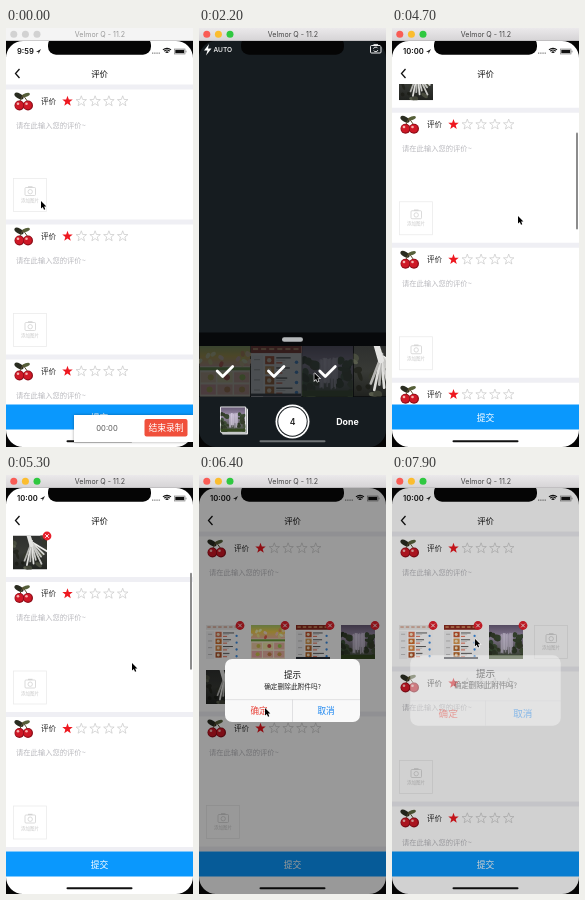
An HTML page with a canvas for the animation above (8000 ms loop, 187 px wide and 419 px high).

```html
<!DOCTYPE html>
<html lang="zh">
<head>
<meta charset="utf-8">
<style>
html, body { margin: 0; width: 100%; height: 100%; overflow: hidden; background: #000; }
canvas { display: block; width: 187px; height: 419px; }
</style>
</head>
<body>
<canvas id="stage"></canvas>
<script>
const W = 187, H = 419, LOOP = 8000, TOP = 13, MID = 93.5;
const cv = document.getElementById('stage'), c = cv.getContext('2d');
const dpr = window.devicePixelRatio || 1;
cv.width = W * dpr;
cv.height = H * dpr;

const CJK = '"Noto Sans CJK SC", "Noto Sans CJK", sans-serif';
const LATIN = 'Inter, Roboto, sans-serif';
const BLUE = '#0a98fd', DARK = '#161c20', BLACK = '#050505';

const clamp = v => Math.max(0, Math.min(1, v));
const ease = v => { v = clamp(v); return v * v * (3 - 2 * v); };
const ramp = (t, from, span) => ease((t - from) / span);
const times = (n, f) => Array.from({ length: n }, (_, i) => f(i));

// Schedule: pick five pictures, confirm, scroll, then delete one after another
const TILE = 51.3, SLIDE = 60, CLOSE = 3500;
const picks = times(5, i => i < 4 ? 700 + i * 250 : 2800);
const asks = times(3, i => 6100 + i * 850);
const answer = ask => ask + 400;
const slideAt = t => SLIDE * ramp(t, 1900, 400);
const scrollAt = t => 181 * Math.sin(Math.PI * clamp((t - 4200) / 1500));
const cell = i => [7 + i % 4 * 45, 88 + (i > 3 ? 45 : 0)];

const stop = (t, x, y, click = true) => ({ t, x, y, click });
const pickStop = i => stop(picks[i], Math.min(172, 26 + i * TILE - slideAt(picks[i])), 345);
const deleteStops = (ask, i) => {
  const [x, y] = cell(i ? 1 : 4);
  return [stop(ask, x + 34, y + 63), stop(answer(ask), 66, 233)];
};
const stops = [
  stop(100, 35, 173),
  ...times(4, pickStop),
  stop(1850, 172, 345, false),
  stop(2400, 112, 345, false),
  pickStop(4),
  stop(CLOSE, 151, 392),
  stop(4300, 126, 188, false),
  stop(5500, 126, 188, false),
  ...asks.flatMap(deleteStops)
];

function rect(x, y, w, h, fill) {
  c.fillStyle = fill;
  c.fillRect(x, y, w, h);
}
function round(x, y, w, h, r, fill) {
  c.beginPath();
  c.roundRect(x, y, w, h, r);
  c.fillStyle = fill;
  c.fill();
}
function disc(x, y, r, fill) {
  c.beginPath();
  c.arc(x, y, r, 0, 7);
  c.fillStyle = fill;
  c.fill();
}
function oval(x, y, rx, ry, turn, fill) {
  c.beginPath();
  c.ellipse(x, y, rx, ry, turn, 0, 7);
  c.fillStyle = fill;
  c.fill();
}
function line(pts, color, w = 1) {
  c.beginPath();
  pts.forEach(([x, y]) => c.lineTo(x, y));
  c.strokeStyle = color;
  c.lineWidth = w;
  c.stroke();
}
function poly(pts, fill) {
  c.beginPath();
  pts.forEach(([x, y]) => c.lineTo(x, y));
  c.closePath();
  c.fillStyle = fill;
  c.fill();
}
function text(s, x, y, size, color, align = 'center', weight = 400, font = CJK) {
  c.font = `${weight} ${size}px ${font}`;
  c.textAlign = align;
  c.textBaseline = 'middle';
  c.fillStyle = color;
  c.fillText(s, x, y);
}
function gradient(h, ...stops) {
  const g = c.createLinearGradient(0, 0, 0, h);
  stops.forEach((s, i) => g.addColorStop(i / (stops.length - 1), s));
  return g;
}
function random(seed) {
  return () => (seed = seed * 16807 % 2147483647) / 2147483647;
}

// Pictures on a 50 x 50 field
function listPic(banner) {
  const rnd = random(banner ? 71 : 29);
  rect(0, 0, 50, 50, '#fdfcfc');
  rect(0, 0, 50, 7, banner ? '#8e2a20' : '#eceae8');
  for (let x = 2; x < 46; x += 8) rect(x, 2, 5, 2, banner ? '#d99a68' : '#d8a08c');
  rect(0, 9, 12, 41, '#f1f1f2');
  for (let y = 10; y < 45; y += 10) {
    rect(3, y + 3, 6, 1, '#aaa');
    rect(14, y, 9, 8, `hsl(${15 + rnd() * 30}, 65%, ${38 + rnd() * 25}%)`);
    disc(18, y + 4, 2.2, '#f4e3c6');
    rect(25, y + 1, 9 + rnd() * 8, 1.4, '#555');
    rect(25, y + 3.6, 9, 1, '#ccc');
    rect(25, y + 6, 6, 1.3, '#e2593c');
    disc(45, y + 6, 1.7, '#3a8ee6');
  }
  if (banner) rect(0, 47, 50, 3, '#2c3038');
}
function foodPic() {
  const rnd = random(13);
  rect(0, 0, 50, 50, '#f8edd2');
  rect(0, 0, 50, 20, gradient(20, '#a9c86a', '#f2d04e', '#f3b7a8'));
  for (let i = 0; i < 14; i++) {
    oval(rnd() * 50, 5 + rnd() * 14, 3, 2, rnd() * 3, `hsl(${rnd() * 70}, 75%, ${60 + rnd() * 30}%)`);
  }
  rect(0, 21, 50, 3, '#6fa23c');
  for (let i = 0; i < 6; i++) {
    const x = 1 + i % 3 * 16.5, y = 26 + (i > 2 ? 12 : 0);
    rect(x, y, 15, 10, `hsl(${rnd() * 60}, 70%, 80%)`);
    disc(x + 5 + rnd() * 5, y + 5, 3, `hsl(${rnd() * 90}, 55%, 55%)`);
  }
}
function fallsPic() {
  const rnd = random(5);
  rect(0, 0, 50, 50, gradient(50, '#675a75', '#9a8ca8', '#6c6870', '#34432a'));
  for (let i = 0; i < 40; i++) {
    const side = rnd() < .5 ? rnd() * 14 : 50 - rnd() * 14;
    oval(side, 14 + rnd() * 36, 3 + rnd() * 3, 2 + rnd() * 3, rnd(), `hsl(${80 + rnd() * 30}, 18%, ${15 + rnd() * 14}%)`);
  }
  for (let i = 0; i < 18; i++) {
    const x = 17 + i, shade = 200 + rnd() * 50;
    rect(x, 11 + rnd() * 3, 1.2, 20 + rnd() * 12, `rgba(${shade - 12},${shade - 20},${shade},.75)`);
  }
  rect(0, 44, 50, 6, '#33471f');
}
function monoPic() {
  const rnd = random(17);
  rect(0, 0, 50, 50, gradient(50, '#2e302e', '#383a36', '#20221f'));
  for (let i = 0; i < 24; i++) {
    oval(rnd() * 50, rnd() * 50, 2 + rnd() * 4, 2 + rnd() * 3, rnd() * 3, `hsl(75, 10%, ${10 + rnd() * 24}%)`);
  }
  c.lineCap = 'round';
  for (let i = 0; i < 9; i++) {
    const a = .35 + i * .2, len = 24 + rnd() * 14, shade = 175 + rnd() * 70;
    line([[25 + i * .4, 8], [25 + len * Math.cos(a) * .8, 12 + len * Math.sin(a)]], `rgb(${shade},${shade},${shade - 3})`, 2.6);
  }
  line([[23, 0], [27, 14]], '#e4e4e2', 6);
  c.lineCap = 'butt';
}
const PICS = [() => listPic(false), foodPic, () => listPic(true), fallsPic, monoPic];
function pic(k, x, y, s) {
  c.save();
  c.beginPath();
  c.rect(x, y, s, s);
  c.clip();
  c.translate(x, y);
  c.scale(s / 50, s / 50);
  PICS[k]();
  c.restore();
}

function cherries(x, y) {
  oval(x + 5, y + 5, 5, 2.6, .5, '#2a2c20');
  oval(x + 12, y + 4, 4, 1.8, -.3, '#56603a');
  for (const dx of [5.5, 14]) {
    line([[x + 9, y + 4], [x + dx, y + 11]], '#5a5030');
    disc(x + dx, y + 14.5, 5, '#8c0d18');
    disc(x + dx - .3, y + 14.2, 4, '#cf1826');
    disc(x + dx - 1.5, y + 12.8, 1.3, '#f5b4b0');
  }
}
function star(x, y, on) {
  c.beginPath();
  for (let i = 0; i < 10; i++) {
    const r = i % 2 ? 2.3 : 5.5, a = -Math.PI / 2 + i * Math.PI / 5;
    c.lineTo(x + r * Math.cos(a), y + r * Math.sin(a));
  }
  c.closePath();
  c.fillStyle = '#ee1820';
  c.strokeStyle = '#c8c8c8';
  c.lineWidth = .7;
  on ? c.fill() : c.stroke();
}
function addBox(x, y) {
  c.lineWidth = .8;
  c.strokeStyle = '#ebebeb';
  c.strokeRect(x + .5, y + .5, 33, 33);
  c.strokeStyle = '#d2d2d2';
  c.beginPath();
  c.roundRect(x + 12, y + 9.5, 10.5, 8, 1);
  c.moveTo(x + 19.4, y + 13.7);
  c.arc(x + 17.2, y + 13.7, 2.2, 0, 7);
  c.stroke();
  rect(x + 15, y + 8.3, 4.5, 1.2, '#d2d2d2');
  text('添加图片', x + 17, y + 22.5, 4.5, '#cacaca');
}
function badge(x, y) {
  disc(x, y, 4.4, '#e8202c');
  for (const d of [-1.8, 1.8]) line([[x - 1.8, y - d], [x + 1.8, y + d]], '#fff', .9);
}

// One review card; returns its height
function card(y, photos) {
  rect(0, y - 5.5, W, 5, '#efeff4');
  cherries(8, y + 1);
  text('评价', 35, y + 11, 7.5, '#222', 'left');
  for (let i = 0; i < 5; i++) star(61.5 + i * 13.8, y + 11.3, i === 0);
  text('请在此输入您的评价~', 10, y + 35, 7.3, '#b9b9be', 'left');
  const cells = Math.min(5, photos.length + 1);
  for (let i = 0; i < cells; i++) {
    const [x, dy] = cell(i);
    if (i < photos.length) {
      pic(photos[i], x, y + dy, 34);
      badge(x + 34, y + dy + .5);
    } else addBox(x, y + dy);
  }
  return cells > 4 ? 180 : 135;
}

function statusBar(t) {
  const late = t >= 3600, x = late ? 34 : 30;
  text(late ? '10:00' : '9:59', 11, 23.5, 7.6, '#111', 'left', 600, LATIN);
  poly([[x, 24], [x + 5, 21], [x + 2.5, 26], [x + 2.4, 24]], '#222');
  for (let i = 0; i < 4; i++) rect(146 + i * 2.2, 24.5, 1.3, 1.3, '#888');
  for (let i = 1; i < 4; i++) {
    c.beginPath();
    c.arc(161, 26, i * 1.9, -2.35, -.8);
    c.strokeStyle = '#111';
    c.lineWidth = 1.2;
    c.stroke();
  }
  c.strokeStyle = '#777';
  c.lineWidth = .6;
  c.strokeRect(168.5, 21, 10.5, 5);
  rect(169.3, 21.8, 8.9, 3.4, '#111');
  rect(179.6, 22.6, .8, 1.8, '#777');
}
function homeBar(color) {
  round(60.5, 412.2, 66, 2, 1, color);
}

function photosAt(t) {
  if (t < CLOSE + 100) return [];
  const gone = asks.filter(a => t >= answer(a) + 50).length;
  const photos = [0, 1, 2, 3, 4].slice(0, gone ? 4 : 5);
  if (gone > 1) photos.splice(1, gone - 1);
  return photos;
}

function page(t) {
  rect(0, TOP, W, H, '#fff');
  const scroll = scrollAt(t);
  let y = 62 - scroll;
  for (let i = 0; y < 385; i++) y += card(y, i ? [] : photosAt(t));
  if (t >= 4300 && t < 5800) round(184, 56 + scroll * .31, 2, 97, 1, '#8c8c8c');

  rect(0, TOP, W, 43, '#fff');
  statusBar(t);
  line([[13.5, 41], [9.5, 45.5], [13.5, 50]], '#111', 1.3);
  text('评价', MID, 45.5, 8.4, '#111', 'center', 500);
  rect(0, 376.5, W, 43, '#fff');
  rect(0, 376.5, W, 25, BLUE);
  text('提交', MID, 389.5, 8.8, '#fff');
  homeBar('#111');
}

function toolbar(n) {
  rect(0, 369, W, 50, DARK);
  if (n) {
    for (let i = Math.min(n, 3) - 1; i >= 0; i--) {
      round(21 + i, 378.5 + i, 26, 26, 1, i % 2 ? '#9fa3a5' : '#f0f0f0');
    }
    pic(n - 1, 21.7, 379.2, 24.6);
    text('Done', 148.5, 394, 8.8, '#fff', 'center', 700, LATIN);
  }
  disc(MID, 393.5, 17, '#fff');
  disc(MID, 393.5, 15.2, DARK);
  disc(MID, 393.5, 14.2, '#fff');
  if (n) text(n, MID, 394, 8.6, '#222', 'center', 600, LATIN);
  homeBar('#6f7375');
}

function camera(t, off) {
  c.save();
  c.translate(0, off);
  rect(0, TOP, W, H, DARK);
  poly([[10, 16], [5, 22.5], [8.5, 22.5], [7, 27.5], [12.5, 20.5], [9, 20.5]], '#fff');
  text('AUTO', 14.5, 21.7, 6.6, '#fff', 'left', 500, LATIN);
  c.strokeStyle = '#fff';
  c.lineWidth = .9;
  c.beginPath();
  c.roundRect(171.5, 17.5, 10.5, 7.5, 1);
  c.stroke();
  for (const a of [.3, .3 + Math.PI]) {
    c.beginPath();
    c.arc(176.7, 21.4, 2.3, a, a + 2.3);
    c.stroke();
  }
  rect(174.5, 16.2, 4.5, 1.3, '#fff');

  rect(0, 304.5, W, 64.5, '#07090b');
  round(83, 309.3, 21, 4.5, 2.2, '#b5b8ba');
  const n = picks.filter(p => t >= p).length;
  c.lineJoin = 'round';
  for (let i = 0; i < 5; i++) {
    const x = i * TILE - slideAt(t);
    pic(i, x, 318, 50.6);
    if (i >= n) continue;
    rect(x, 318, 50.6, 50.6, 'rgba(20,24,27,.75)');
    c.lineCap = 'round';
    line([[x + 17.5, 343], [x + 23, 348.5], [x + 33, 338.5]], '#fff', 2.8);
    c.lineCap = 'butt';
  }
  c.lineJoin = 'miter';
  toolbar(n);
  c.restore();
}

function alertBox(t, ask) {
  const grow = clamp((t - ask - 10) / 200);
  const show = grow * (1 - clamp((t - answer(ask) - 10) / 200));
  if (!show) return;
  rect(0, TOP, W, H, `rgba(0,0,0,${.4 * show})`);
  c.save();
  c.globalAlpha = show;
  const s = 1 + .21 * (1 - grow);
  c.translate(MID, 215.5);
  c.scale(s, s);
  c.translate(-MID, -215.5);
  round(26, 184, 135, 63, 7, '#f9f9f9');
  text('提示', MID, 200, 8.6, '#111', 'center', 500);
  text('确定删除此附件吗?', MID, 211, 6.7, '#222');
  rect(26, 224.5, 135, .6, '#cfcfd2');
  rect(93.2, 224.5, .6, 22.5, '#cfcfd2');
  text('确定', 60, 236, 8.6, '#e8453c');
  text('取消', 127, 236, 8.6, '#1583f0');
  c.restore();
}

// Window bar, screen corners and notch
function shell(t) {
  c.beginPath();
  c.rect(0, TOP, W, H - TOP);
  c.roundRect(0, TOP, W, H - TOP, 17);
  c.fillStyle = BLACK;
  c.fill('evenodd');
  round(42, 9, 103, 17.7, 8, BLACK);

  const active = t >= 100;
  rect(0, 0, W, TOP, active ? gradient(TOP, '#ebe9eb', '#d5d3d5') : '#f4f4f4');
  rect(0, 12.4, W, .6, '#b5b3b5');
  ['#f95c55', '#fbbd2f', '#2fc840'].forEach((f, i) => disc(7.8 + i * 11.6, 6.3, 3.5, active ? f : '#d2d2d2'));
  text('Velmor Q - 11.2', 94, 6.6, 7.1, active ? '#444' : '#999', 'center', 400, LATIN);
}

function recorder(t) {
  if (t >= 1600) return;
  c.save();
  c.shadowColor = 'rgba(0,0,0,.35)';
  c.shadowBlur = 3 * dpr;
  rect(68, 387, 119, 27, '#fff');
  c.restore();
  text(t < 900 ? '00:00' : '00:01', 101, 400.3, 7.6, '#555', 'center', 400, LATIN);
  round(138.5, 391, 43, 17.5, 2, '#f0503c');
  text('结束录制', 160, 399.6, 8.8, '#fff', 'center', 500);
}

// The pointer rests around each stop and glides in between
function pointer(t) {
  let { x, y } = stops[0];
  for (let i = 1; i < stops.length; i++) {
    const a = stops[i - 1], b = stops[i];
    const p = ramp(t, a.t + 50, b.t - a.t - 200);
    if (t > a.t + 50) {
      x = a.x + (b.x - a.x) * p;
      y = a.y + (b.y - a.y) * p;
    }
  }
  if (stops.some(s => s.click && t >= s.t && t < s.t + 100)) {
    c.beginPath();
    c.arc(x + 1, y + 1, 13, 0, 7);
    c.strokeStyle = 'rgba(150,150,150,.75)';
    c.lineWidth = 1.4;
    c.stroke();
  }
  c.save();
  c.translate(x, y);
  const arrow = [[0, 0], [0, 7.6], [1.8, 6], [3, 8.8], [4.3, 8.2], [3.1, 5.5], [5.4, 5.4], [0, 0]];
  line(arrow, '#fff', 1.2);
  poly(arrow, '#000');
  c.restore();
}

function draw(t) {
  c.setTransform(dpr, 0, 0, dpr, 0, 0);
  page(t);
  const up = ramp(t, 150, 400) * (1 - ramp(t, CLOSE + 50, 400));
  if (up > 0) camera(t, (1 - up) * (H - TOP));
  asks.forEach(a => alertBox(t, a));
  shell(t);
  recorder(t);
  pointer(t);
}

const start = performance.now();
function tick(now) {
  const t = Math.max(0, now - start) % LOOP;
  draw(Math.floor(t / 100) * 100);
  requestAnimationFrame(tick);
}
draw(0);
requestAnimationFrame(tick);
</script>
</body>
</html>
```
